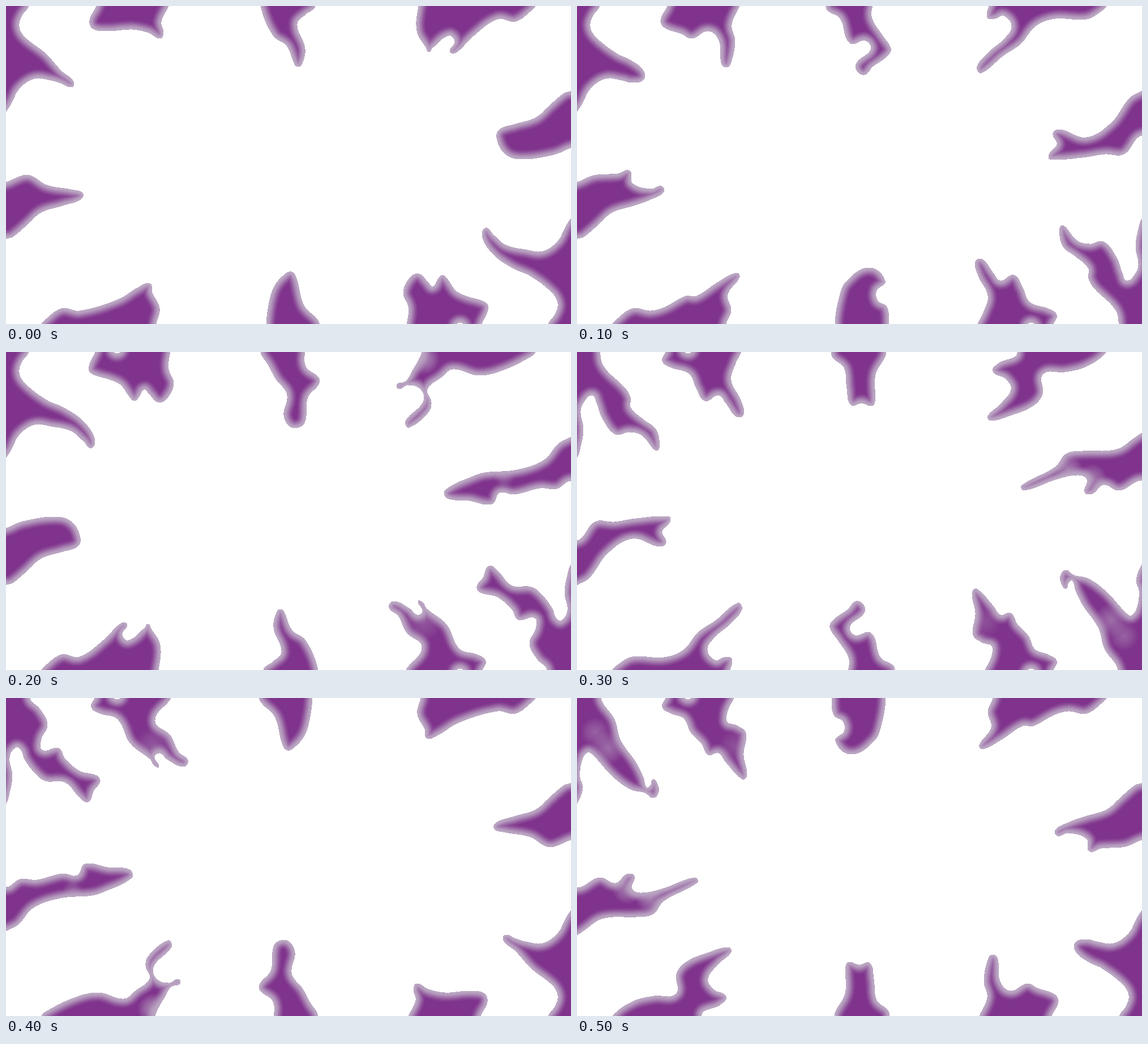
These frames come from a looping animation (998 by 561 pixels, 600 ms). An HTML page with a canvas:

```html
<!DOCTYPE html>
<html lang="en">
<head>
<meta charset="utf-8">
<title>Purple flame border</title>
<style>
  html, body { margin: 0; width: 100%; height: 100%; overflow: hidden; background: #fff; }
  canvas { display: block; width: 100vw; height: 100vh; }
</style>
</head>
<body>
<canvas width="998" height="561"></canvas>
<script>
const W = 998, H = 561, STEP = 100, COUNT = 6;
const BODY = [127, 51, 140], RIM = [187, 168, 195], RIM_DEPTH = 18;

// Outline parts shared by several poses.
const cornerTop = '40,0 28,17 23,36 33,55 70,84 ';
const cornerEnd = ' 80,131 50,128 24,145 9,172 0,186';
const cornerSlit = ' 6,105 11,137 5,172 0,186';
const toothTop = '157,0 151,16 166,27 ';
const bubble = '|188,-4 196,3 204,-4 196,-11';
const crestEnd = ' 868,23 900,27 930,6 935,0';
const sideTop = '0,311 30,299 ';
const sideEnd = ' 100,352 62,364 38,385 12,407 0,411';

// Each flame has six key poses and a half-turn copy that runs `lag` poses off.
// close: points beyond the stage; haze: pose -> [x, y, radius, opacity].
const flames = [
  {
    lag: 2, dx: 0, close: ' -12,200 -50,205 -50,-50 50,-35',
    poses: [
      cornerTop + '97,114 119,133 116,143 97,136' + cornerEnd,
      cornerTop + '95,96 117,114 117,130 97,135' + cornerEnd,
      cornerTop + '103,99 136,122 156,152 151,169 137,157 115,139' + cornerEnd,
      '41,0 48,27 84,63 94,80 95,99 118,120 140,138 145,170 138,173 115,147 92,141 68,145 45,117 35,90 27,76 12,88' + cornerSlit,
      '42,0 60,20 73,47 62,73 64,92 93,89 104,107 130,129 160,137 166,147 155,163 145,183 130,175 105,149 70,146 52,133 33,108 27,92 17,87' + cornerSlit,
      '42,0 66,38 77,75 104,114 117,140 123,158 130,154 134,144 141,150 144,165 135,176 120,167 95,161 63,138 28,100 18,96 8,112 5,140 10,158 0,186'
    ],
    haze: { 5: [[32, 60, 26, .4], [55, 88, 30, .5]] }
  },
  {
    lag: 2, dx: 0, close: ' 300,-30 290,-55 160,-55 168,-30',
    poses: [
      '160,0 148,25 154,40 180,44 222,41 252,47 272,57 278,47 274,28 287,0',
      '160,0 148,25 155,38 185,49 203,57 232,44 251,61 255,100 263,108 271,102 279,62 273,33 287,0',
      '158,0 147,25 150,37 185,49 203,58 220,81 227,86 234,80 244,66 253,74 268,88 283,83 296,56 287,30 290,0' + bubble,
      toothTop + '198,38 211,64 226,86 250,76 263,90 282,114 294,110 289,85 272,50 280,20 290,0' + bubble,
      toothTop + '197,37 220,80 255,108 262,119 270,121 262,104 272,97 285,108 313,121 321,110 305,96 290,66 263,40 291,0' + bubble,
      toothTop + '189,36 201,60 220,80 232,100 250,97 263,113 292,143 300,136 294,100 298,62 283,49 264,40 277,0' + bubble
    ],
    haze: { 4: [[260, 84, 32, .3]], 5: [[278, 85, 28, .25]] }
  },
  {
    lag: 4, dx: 3, close: ' 541,-45 450,-45',
    poses: [
      '450,0 472,52 496,70 508,98 513,106 521,105 528,75 514,32 530,14 546,0',
      '440,0 443,8 465,22 482,65 510,61 519,77 495,99 494,113 508,121 522,107 548,88 554,75 540,53 521,22 522,0',
      '450,0 463,22 478,49 494,68 497,82 491,112 503,132 521,131 529,119 533,80 552,57 552,45 530,27 528,0',
      '449,0 453,11 472,28 477,65 484,93 503,90 520,95 526,88 527,40 543,10 546,0',
      '447,0 475,33 488,80 497,92 510,86 527,66 536,38 541,0',
      '450,0 454,30 470,41 472,59 457,76 485,99 525,75 538,45 545,0'
    ]
  },
  {
    lag: 4, dx: 0, close: ' 960,-45 740,-45',
    poses: [
      '729,0 726,44 742,73 747,81 753,74 782,52 793,63 784,80 795,82 824,54' + crestEnd,
      '728,0 725,20 738,22 754,17 768,36 755,58 727,82 707,107 714,118 752,88 784,66 810,35 845,22 900,23 930,6 935,0',
      '735,0 717,35 706,52 691,57 694,65 710,58 733,66 737,88 706,122 712,133 746,106 751,88 744,66 768,45 790,30 835,41 880,31 930,6 935,0',
      '778,0 745,20 735,34 757,47 767,66 747,93 726,113 731,121 765,112 805,95 822,74 823,39 862,35 898,26 935,0',
      '733,0 727,28 740,55 744,71 765,64 800,43' + crestEnd,
      '735,0 726,24 732,52 711,83 717,90 750,73 787,49 806,49 842,30' + crestEnd
    ],
    haze: { 2: [[738, 12, 28, .75]] }
  },
  {
    lag: 2, dx: 0, close: ' -45,440 -45,320',
    poses: [
      sideTop + '45,300 72,316 115,324 135,330 132,341' + sideEnd,
      sideTop + '72,296 93,291 98,313 130,323 149,318 153,328 128,342' + sideEnd,
      sideTop + '90,291 117,301 131,328 126,343' + sideEnd,
      '0,333 32,300 65,300 105,294 163,291 163,301 150,317 157,336 145,343 98,329 54,355 22,398 0,411',
      '0,334 25,320 55,321 100,310 126,313 140,293 180,299 218,303 222,317 172,342 152,348 95,353 48,370 22,399 0,411',
      '0,335 40,317 68,327 88,311 101,314 97,336 112,344 150,337 207,317 213,325 153,358 134,381 105,386 45,389 12,410 0,418'
    ],
    haze: { 4: [[118, 340, 18, .4]], 5: [[88, 338, 26, .6], [130, 355, 26, .6]] }
  }
];

// Closed curve through the points, with handles scaled to each segment.
function smooth(text) {
  const pts = text.trim().split(' ').map(p => p.split(',').map(Number));
  const n = pts.length;
  const dirs = pts.map((_, i) => {
    const a = pts[(i + n - 1) % n], b = pts[(i + 1) % n];
    const dx = b[0] - a[0], dy = b[1] - a[1], len = Math.hypot(dx, dy);
    return [dx / len, dy / len];
  });
  return 'M' + pts[0] + pts.map((p, i) => {
    const j = (i + 1) % n, q = pts[j], u = dirs[i], v = dirs[j];
    const h = Math.hypot(q[0] - p[0], q[1] - p[1]) * 0.37;
    return 'C' + [p[0] + u[0] * h, p[1] + u[1] * h, q[0] - v[0] * h, q[1] - v[1] * h, ...q];
  }).join('') + 'Z';
}

for (const flame of flames) {
  flame.paths = flame.poses.map(pose => {
    const [edge, hole] = pose.split('|');
    return new Path2D(smooth(edge + flame.close) + (hole ? smooth(hole) : ''));
  });
}

const ctx = document.querySelector('canvas').getContext('2d');
ctx.lineJoin = 'round';

const rgb = (c, a = 1) => `rgba(${c}, ${a})`;
const mix = t => rgb(BODY.map((c, i) => c + (RIM[i] - c) * t));

function drawHaze([x, y, r, alpha]) {
  const g = ctx.createRadialGradient(x, y, 0, x, y, r);
  g.addColorStop(0, rgb(RIM, alpha));
  g.addColorStop(0.5, rgb(RIM, alpha * 0.6));
  g.addColorStop(1, rgb(RIM, 0));
  ctx.fillStyle = g;
  ctx.fillRect(x - r, y - r, 2 * r, 2 * r);
}

// Nested strokes inside the outline shade it by distance from its edge.
function drawFlame(flame, pose) {
  const path = flame.paths[pose];
  ctx.save();
  ctx.clip(path, 'evenodd');
  ctx.fillStyle = rgb(BODY);
  ctx.fill(path, 'evenodd');
  for (let d = RIM_DEPTH; d > 0; d--) {
    const t = 1 - (d - 0.5) / RIM_DEPTH;
    ctx.strokeStyle = mix(t * t * (3 - 2 * t));
    ctx.lineWidth = 2 * d;
    ctx.stroke(path);
  }
  if (flame.haze && flame.haze[pose]) flame.haze[pose].forEach(drawHaze);
  ctx.restore();
}

function drawStep(step) {
  ctx.fillStyle = '#fff';
  ctx.fillRect(0, 0, W, H);
  for (const flame of flames) {
    drawFlame(flame, step);
    ctx.save();
    ctx.translate(W + flame.dx, H);
    ctx.rotate(Math.PI);
    drawFlame(flame, (step + flame.lag) % COUNT);
    ctx.restore();
  }
}

let shown = -1;
const start = performance.now();
function tick() {
  const step = Math.floor((performance.now() - start) / STEP) % COUNT;
  if (step !== shown) drawStep(shown = step);
  requestAnimationFrame(tick);
}
tick();
</script>
</body>
</html>
```
